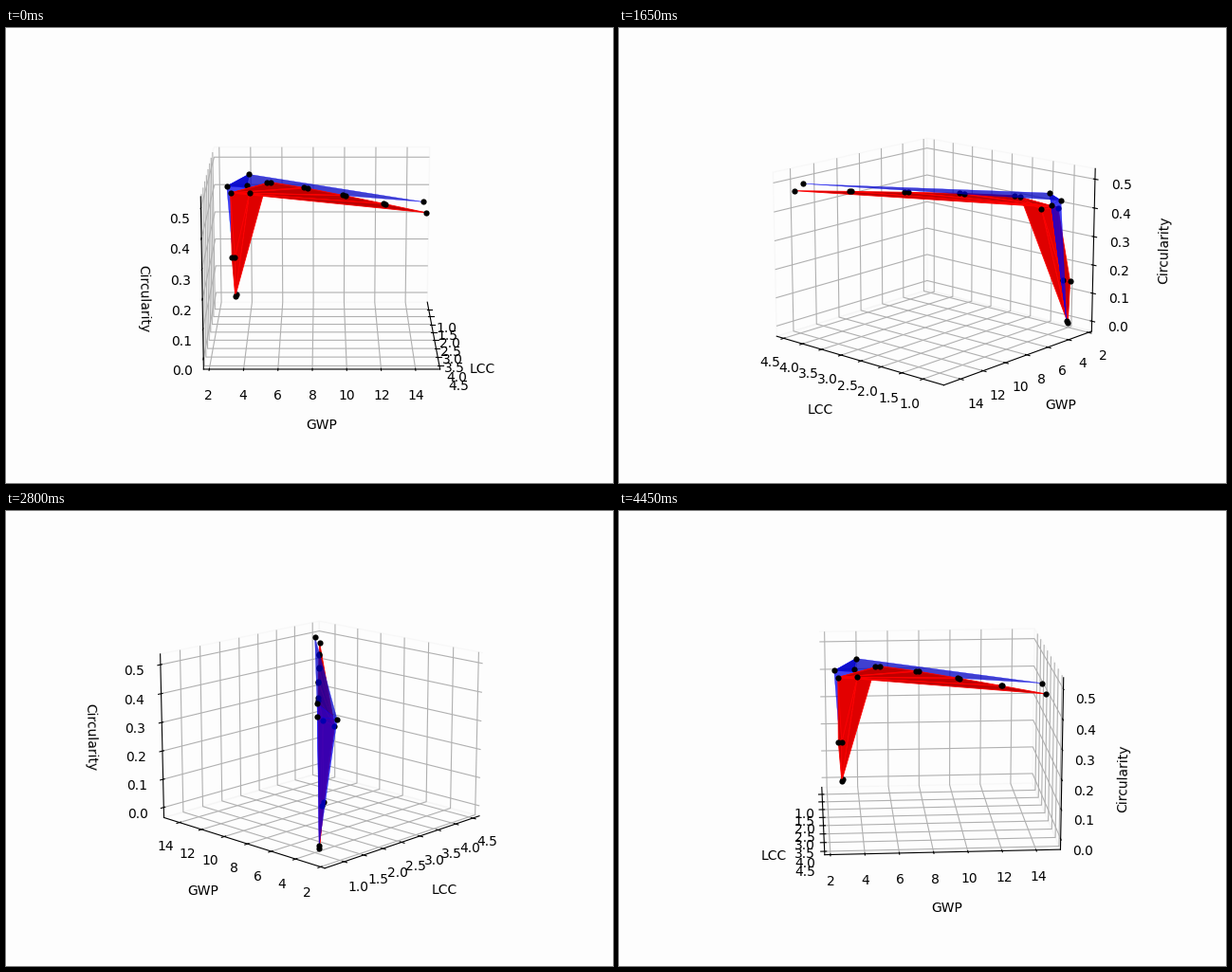
These frames come from a looping animation (640 by 480 pixels, 4.5 s). A matplotlib script:

```python
import matplotlib.pyplot as plt
import numpy as np
from matplotlib.animation import FuncAnimation

plt.rcParams["font.family"] = "DejaVu Sans"

FRAMES, INTERVAL = 90, 50
ELEV = 15
# A hair off the right angles, so the choice of axis sides is never a tie.
AZIMS = np.linspace(1e-4, 355.999, FRAMES)
PAPER = "#fdfdfd"
MARGIN = 0.0729


def ridge(start, end, steps=4):
    """Pairs of points from start to end, bowed slightly, rising as a square root."""
    t = np.arange(steps) / steps
    t = np.concatenate([t, t + 0.028 * (1 - t), [1]])[:, None]
    line = start + (end - start) * np.hstack([t, t, np.sqrt(t)])
    line[:, :1] -= 0.03 * t * (1 - t)
    return line


# Points are (LCC, GWP, circularity).
foot = (0.782, 2.951, 0.0)
knee = np.array((1.429, 5.098, 0.446))
tip = np.array((4.424, 14.554, 0.4724))
RED = np.vstack([
    ridge(knee, tip), foot,
    (1.106, 2.783, 0.395), (1.201, 3.993, 0.3985),
    (0.791, 2.771, 0.145), (0.903, 2.975, 0.150),
])
BLUE = np.array([
    (1.096, 2.546, 0.419), (1.033, 3.929, 0.459), (1.012, 3.825, 0.418),
    (4.243, 14.399, 0.500), (0.798, 3.021, 0.008),
])

everything = np.vstack([RED, BLUE])
low, high = everything.min(axis=0), everything.max(axis=0)
pad = MARGIN * (high - low)
low, high = low - pad, high + pad

fig = plt.figure(figsize=(6.4, 4.8), dpi=100, facecolor=PAPER)
ax = fig.add_subplot(projection="3d", computed_zorder=False)
ax.set_facecolor(PAPER)


def add_front(points, color, alpha, linewidth):
    surface = ax.plot_trisurf(*points.T, color=color, edgecolor=color,
                              alpha=alpha, linewidth=linewidth)
    dots = ax.scatter(*points.T, color="black", s=20, linewidths=0, depthshade=False)
    return surface, dots


def nearest(points, azim):
    """How far the points reach towards the camera, in box units."""
    box = ((points - low) / (high - low) - 0.5) * (4, 4, 3)
    e, a = np.radians((ELEV, azim))
    return (box @ (np.cos(e) * np.cos(a), np.cos(e) * np.sin(a), np.sin(e))).max()


def stack(front, base):
    surface, dots = front
    surface.set_zorder(base)
    dots.set_zorder(base + 1)


red_front = add_front(RED, "red", 1, 0.6)
blue_front = add_front(BLUE, "blue", 0.75, 0.2)

ax.set(xlim=(low[0], high[0]), ylim=(low[1], high[1]), zlim=(low[2], high[2]))
ax.set_xticks(np.arange(1, 5, 0.5))
ax.set_xlabel("LCC", labelpad=10)
ax.set_ylabel("GWP", labelpad=10)
ax.set_zlabel("Circularity", labelpad=10)
for axis in (ax.xaxis, ax.yaxis, ax.zaxis):
    axis.pane.fill = False
    axis.pane.set_edgecolor("#f3f3f3")


def update(i):
    azim = AZIMS[i]
    ax.view_init(elev=ELEV, azim=azim)
    red_on_top = nearest(RED, azim) > nearest(BLUE, azim)
    stack(red_front, 5 if red_on_top else 3)
    stack(blue_front, 3 if red_on_top else 5)
    return ()


anim = FuncAnimation(fig, update, frames=FRAMES, interval=INTERVAL,
                     init_func=lambda: update(0), repeat=True, repeat_delay=0)
plt.show()
```
